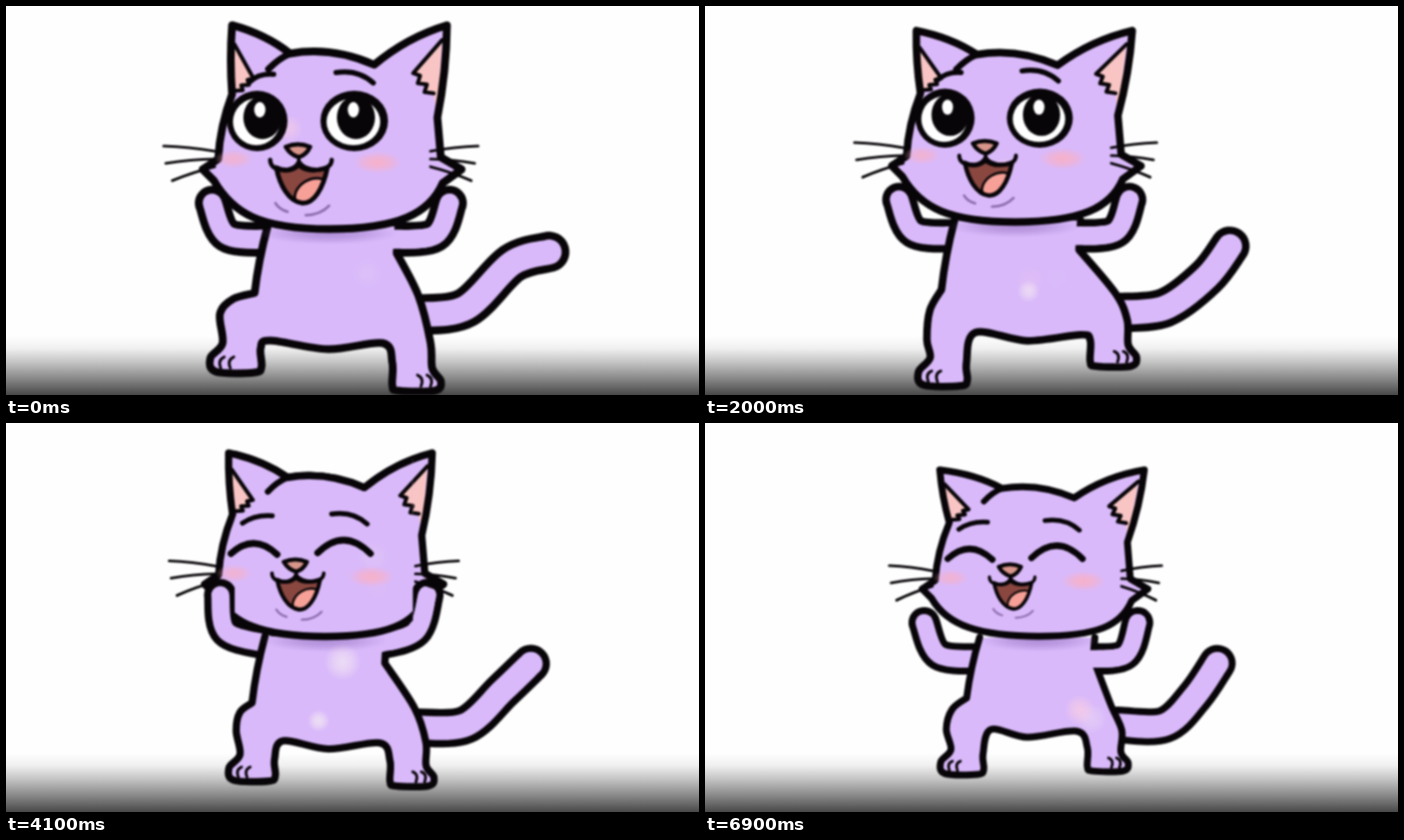
These frames come from a looping animation (800x450 px, 7000 ms). An HTML page with a canvas:

```html
<!DOCTYPE html>
<html lang="en">
<head>
<meta charset="utf-8">
<title>Dancing cat</title>
<style>
html, body { margin: 0; width: 100%; height: 100%; overflow: hidden; }
body { background: linear-gradient(#fefefe 0 382px, #f0f0f0 396px, #c4c4c4 412px, #858585 432px, #484848 450px); }
canvas { display: block; width: 800px; height: 450px; filter: blur(.9px); }
</style>
</head>
<body>
<canvas id="stage" width="800" height="450"></canvas>
<script>
const ctx = document.getElementById('stage').getContext('2d');
const LOOP = 7000, STEP = 100;
const FUR = '#d9b9fa', INK = '#080508', PINK = '#f9c5c4';

// The dance: time, nose x, nose y, arms raised, step (left +, right -), ear splay, tail angle
const DANCE = [
  [0, 337, 167, 0, 1, .1, -17],
  [1200, 335, 174, 1, 0, .1, 10],
  [2000, 323, 163, 0, -1, .4, -53],
  [3400, 330, 161, 1, 1, 1, -19],
  [4800, 338, 168, .55, -.3, -.6, -69],
  [5900, 350, 171, .75, 0, -.1, -86],
  [6900, 352, 170, 0, 0, .6, -56]];

const mix = (a, b, k) => a + (b - a) * k;
const between = (p, q, k) => [mix(p[0], q[0], k), mix(p[1], q[1], k)];
const clamp = v => Math.min(1, Math.max(0, v));

function danceAt(time) {
  let i = 0;
  while (i < DANCE.length - 2 && time >= DANCE[i + 1][0]) i++;
  const [a, b] = [DANCE[i], DANCE[i + 1]];
  const ease = (1 - Math.cos(Math.PI * (time - a[0]) / (b[0] - a[0]))) / 2;
  return a.map((v, n) => mix(v, b[n], ease));
}

// All joints follow from the dance and the slow zoom out (u runs 0..1).
function rig(time) {
  const [, nx, ny, raise, step, splay, angle] = danceAt(time);
  const u = time / LOOP, s = 1 - .16 * u, face = 1 - .08 * u;
  const rel = (x, y) => [nx + x, ny + y];
  const arm = (side, hand, handUp, elbow, elbowUp, shoulder) => [
    rel(side * mix(hand, handUp, raise), mix(61, 27, raise)),
    rel(side * mix(elbow, elbowUp, raise), mix(98, 70, raise)),
    rel(side * shoulder, mix(103, 87, raise))];
  const footL = [265 + 32 * u, 436 - 30 * u - 12 * step];
  const footR = [473 - 9 * u, 445 - 43 * u + 16 * Math.min(0, step)];
  const bend = angle * Math.PI / 180;
  const tailMid = [584 - 18 * u, 290 - .45 * angle];
  return {
    s, face, raise, footL, footR,
    line: 9 - u, nose: [nx, ny], mouth: 1 - .2 * u,
    open: 1 - clamp((time - 2500) / 300),
    neck: rel(-35, 88 - 10 * u), hipL: [nx - 50, 332 - 14 * u],
    hipR: [476 - 8 * u, 335 - 10 * u], pit: [nx + 114 * s, 286 - 14 * u],
    kneeL: [footL[0] - 18, footL[1] - (62 + 6 * step) * s],
    kneeR: [footR[0] + 17, footR[1] - 56 * s],
    crotch: [[footL[0] + 40 * s, 387 - 33 * u], [372, 397 - 34 * u], [435 - 6 * u, 390 - 34 * u]],
    tail: [[476, 357 - 8 * u], [531, 349], tailMid,
      [tailMid[0] + 45 * Math.cos(bend), tailMid[1] + 45 * Math.sin(bend)]],
    armL: arm(-1, 99, 83, 82, 79, 34),
    armR: arm(s, 175, 166, 158, 152, 107),
    earL: { outer: rel(-76 * face, -65 * s), tip: rel(-75 - 10 * splay, -146 * s + 12 * splay), inner: rel(-9, -112 * s) },
    earR: { outer: rel(161 * s, -38 * s), tip: rel(170 * s + 20 * splay, -146 * s + 12 * splay), inner: rel(88 * s, -99 * s) },
    crown: rel(38, -113 * s), chin: rel(36 * face, 91 * s),
    tuftL: rel(-110 * face, 22), tuftR: rel(189 * s, 22)
  };
}

// Smooth curve through the points; joins on if the path is under way.
function through(path, pts, join) {
  if (!join) path.moveTo(...pts[0]);
  for (let i = 0; i < pts.length - 1; i++) {
    const b = pts[i], c = pts[i + 1], a = pts[i - 1] || b, d = pts[i + 2] || c;
    path.bezierCurveTo(b[0] + (c[0] - a[0]) / 6, b[1] + (c[1] - a[1]) / 6,
      c[0] - (d[0] - b[0]) / 6, c[1] - (d[1] - b[1]) / 6, c[0], c[1]);
  }
  return path;
}
const curve = pts => through(new Path2D(), pts);

function bow(path, from, to, dx, dy) {
  const m = between(from, to, .5);
  path.quadraticCurveTo(m[0] + dx, m[1] + dy, ...to);
}
function ink(path, width, color = INK) {
  ctx.lineWidth = width;
  ctx.strokeStyle = color;
  ctx.stroke(path);
}
function paint(path, color) {
  ctx.fillStyle = color;
  ctx.fill(path);
}
function hair(from, to, dx, dy, width, color) {
  const p = new Path2D();
  p.moveTo(...from);
  bow(p, from, to, dx, dy);
  ink(p, width, color);
}
function oval(x, y, rx, ry, turn = 0) {
  const p = new Path2D();
  p.ellipse(x, y, rx, ry, turn, 0, 7);
  return p;
}
function glow(x, y, rx, ry, rgb, alpha) {
  ctx.save();
  ctx.translate(x, y);
  ctx.scale(1, ry / rx);
  const g = ctx.createRadialGradient(0, 0, 0, 0, 0, rx);
  g.addColorStop(0, `rgba(${rgb},${alpha})`);
  g.addColorStop(.45, `rgba(${rgb},${alpha * .7})`);
  g.addColorStop(1, `rgba(${rgb},0)`);
  ctx.fillStyle = g;
  ctx.fillRect(-rx, -rx, rx * 2, rx * 2);
  ctx.restore();
}
function tube(pts, width, line) {
  const p = curve(pts);
  ink(p, width);
  ink(p, width - line * 2, FUR);
}

function bodyPath({ s, neck, hipL, hipR, pit, kneeL, kneeR, footL, footR, crotch }) {
  const left = (x, y) => [footL[0] + x * s, footL[1] + y * s];
  const right = (x, y) => [footR[0] + x * s, footR[1] + y * s];
  const thigh = between(hipL, kneeL, .5);
  const p = new Path2D();
  p.moveTo(...neck);
  bow(p, neck, hipL, -3, 0);
  through(p, [hipL, [thigh[0] - 5, thigh[1] - 5], kneeL,
    left(-15, -34), left(-29, -17), left(-23, -1), left(22, 0), left(30, -7), left(29, -28), ...crotch,
    right(-27, -32), right(-27, -6), right(-20, 0), right(22, 0), right(29, -11), right(19, -26),
    kneeR, hipR, pit], true);
  p.lineTo(pit[0] + 2, neck[1]);
  return p;
}

function drawToes({ s, footL, footR }) {
  for (const [foot, side] of [[footL, -1], [footR, 1]])
    for (const dx of [6, 17]) {
      const x = foot[0] + side * dx * s, y = foot[1] - 5 * s;
      hair([x, y], [x - side * 4 * s, y - 13 * s], side * 6 * s, -3, 3.2);
    }
}

function jaw(p, { s, tuftL, tuftR, chin }) {
  const r = [tuftR[0] - 22 * s, tuftR[1] + 16 * s], l = [tuftL[0] + 13 * s, tuftL[1] + 13 * s];
  p.lineTo(...r);
  p.bezierCurveTo(r[0] - 15 * s, r[1] + 35 * s, chin[0] + 80 * s, chin[1], ...chin);
  p.bezierCurveTo(chin[0] - 80 * s, chin[1], l[0] + 22 * s, l[1] + 38 * s, ...l);
}

// Pink inside of an ear with a ragged tuft, in coordinates along the ear's two edges.
function innerEar({ tip, inner, outer }, top, bend, end) {
  const spot = ([a, b]) => [0, 1].map(n =>
    tip[n] + a * (inner[n] - tip[n]) + b * (outer[n] - tip[n]));
  const pts = [top, bend];
  for (let i = 1; i <= 5; i++) {
    const [a, b] = between(bend, end, i / 5);
    pts.push([a + (i % 2 ? -.05 : .03), b]);
  }
  const p = new Path2D();
  pts.forEach(q => p.lineTo(...spot(q)));
  const fill = new Path2D(p);
  fill.lineTo(...outer);
  paint(fill, PINK);
  ink(p, 4.5);
}

function drawHead(cat) {
  const { s, line, earL, earR, crown, tuftL, tuftR } = cat;
  const p = new Path2D();
  p.moveTo(...earL.outer);
  bow(p, earL.outer, earL.tip, -3, 0);
  bow(p, earL.tip, earL.inner, 5, -6);
  bow(p, earL.inner, earR.inner, 0, 2 * crown[1] - earL.inner[1] - earR.inner[1]);
  bow(p, earR.inner, earR.tip, -4, -9);
  bow(p, earR.tip, earR.outer, 5, 0);
  p.lineTo(tuftR[0] - 24 * s, tuftR[1] - 14 * s);
  p.lineTo(...tuftR);
  jaw(p, cat);
  p.lineTo(...tuftL);
  p.lineTo(tuftL[0] + 18 * s, tuftL[1] - 12 * s);
  p.quadraticCurveTo(tuftL[0] + 20 * s, tuftL[1] - 50 * s, ...earL.outer);
  p.closePath();
  paint(p, FUR);
  innerEar(earL, [.04, .26], [.37, .62], [.1, .93]);
  innerEar(earR, [.05, .14], [.42, .34], [.14, .7]);
  ink(p, line);
  const [x, y] = earL.inner;
  hair([x - 25 * s, y + 18 * s], [x, y], -1, -3, line * .85);
}

function drawEye(x, rx, look, open) {
  ctx.save();
  ctx.translate(x, -34);
  ctx.scale(1, open);
  paint(oval(0, 0, rx, 35), INK);
  paint(oval(-1, 1, rx - 8, 27), '#fff');
  paint(oval(look, -4, 22, 25), INK);
  paint(oval(look - 3, -13, 6.5, 9), '#fff');
  ctx.restore();
}

function drawMouth(m) {
  ctx.save();
  ctx.scale(m, m);
  const p = new Path2D();
  p.moveTo(-25, 20);
  p.quadraticCurveTo(-10, 27, 1, 17);
  p.quadraticCurveTo(12, 27, 34, 20);
  p.bezierCurveTo(29, 45, 18, 62, 5, 61);
  p.bezierCurveTo(-11, 59, -21, 40, -25, 20);
  paint(p, '#8a4740');
  ctx.save();
  ctx.clip(p);
  const tongue = oval(16, 49, 21, 15, -.55);
  paint(tongue, '#f7a097');
  ink(tongue, 3);
  ctx.restore();
  ink(p, 5.5);
  const lip = new Path2D();
  lip.moveTo(-32, 11);
  lip.bezierCurveTo(-32, 27, -3, 26, 1, 13);
  lip.bezierCurveTo(8, 26, 39, 26, 39, 11);
  ink(lip, 5);
  const shade = 'rgba(90,55,120,.6)';
  hair([-26, 61], [-12, 71], -3, 2, 3, shade);
  hair([9, 75], [36, 64], 4, 5, 3, shade);
  ctx.restore();
}

function drawFace({ nose, face, mouth, open }) {
  ctx.save();
  ctx.translate(...nose);
  ctx.scale(face, face);
  glow(92, 14, 28, 13, '250,176,196', .9);
  glow(-74, 10, 22, 11, '250,176,196', .75);
  if (open > .5) {
    const lid = mix(.2, 1, open * 2 - 1);
    drawEye(-47, 35, 6, lid);
    drawEye(65, 39, 2, lid);
  } else {
    hair([-78, -14], [-22, -13], 0, -26, 8);
    hair([27, -15], [91, -14], 0, -32, 8);
  }
  const lift = open * 28;
  hair([-64 + open * 8, -51 - lift], [-28, -60 - lift], -3, -6, 6);
  hair([44, -62 - lift], [87, -50 - lift], 4, -10, 6);

  const tip = new Path2D();
  tip.moveTo(-14, -4);
  tip.quadraticCurveTo(0, -10, 14, -4);
  tip.quadraticCurveTo(10, 5, 1, 8);
  tip.quadraticCurveTo(-9, 5, -14, -4);
  paint(tip, '#d8958b');
  ink(tip, 5);
  hair([1, 8], [1, 14], 0, 0, 4);
  drawMouth(mouth);
  ctx.restore();
}

function drawWhiskers({ s, tuftL, tuftR }) {
  for (let i = 0; i < 3; i++) {
    const fan = -27 + 20 * i, root = -21 + 9 * i;
    hair([tuftL[0] + (-45 + 5 * i * i / 2) * s, tuftL[1] + fan], [tuftL[0] + 14 * s, tuftL[1] + root], 0, -2, 3.2);
    hair([tuftR[0] + (19 - 4 * i) * s, tuftR[1] + fan], [tuftR[0] - 36 * s, tuftR[1] + root], 0, -2, 3.2);
  }
}

// Soft sparkles that fade in and out, alternating between belly and cheeks.
function drawGlows(time, { nose }) {
  let seed = 11;
  const rand = () => (seed = seed * 16807 % 2147483647) / 2147483647;
  for (let i = 0; i < 24; i++) {
    const dx = mix(-10, 95, rand()), dy = i % 3 ? mix(110, 190, rand()) : mix(-90, 55, rand());
    const r = mix(13, 22, rand()), pink = rand() < .35;
    const a = 1 - Math.abs(time - (i + .5) * LOOP / 24) / 500;
    if (a > 0) glow(nose[0] + dx, nose[1] + dy, r, r, pink ? '252,208,226' : '255,253,240', a * .75);
  }
}

function draw(time) {
  const cat = rig(time);
  const { s, line, armL, armR, chin } = cat;
  const body = bodyPath(cat), thick = 40 * mix(1, s, .6);
  const raised = cat.raise > .5;

  ctx.clearRect(0, 0, 800, 450);
  ctx.lineCap = ctx.lineJoin = 'round';
  tube(cat.tail, thick * 1.17, line);
  if (raised) drawHead(cat);
  tube(armL, thick, line);
  tube(armR, thick, line);
  paint(body, FUR);
  ink(body, line);
  drawToes(cat);
  ink(curve(armR), thick - line * 2, FUR);
  glow(chin[0], chin[1] + 5, 80 * s, 13, '150,115,195', .6);

  // Raised hands overlap the cheeks, the face shows between them.
  ctx.save();
  if (raised) {
    const left = armL[0][0] + thick * .44, right = armR[0][0] - thick * .44;
    ctx.beginPath();
    ctx.rect(left, 0, right - left, 450);
    ctx.clip();
  }
  drawHead(cat);
  ctx.restore();
  drawGlows(time, cat);
  drawFace(cat);
  drawWhiskers(cat);
}

function tick() {
  draw(Math.floor(performance.now() % LOOP / STEP) * STEP);
  requestAnimationFrame(tick);
}
tick();
</script>
</body>
</html>
```
